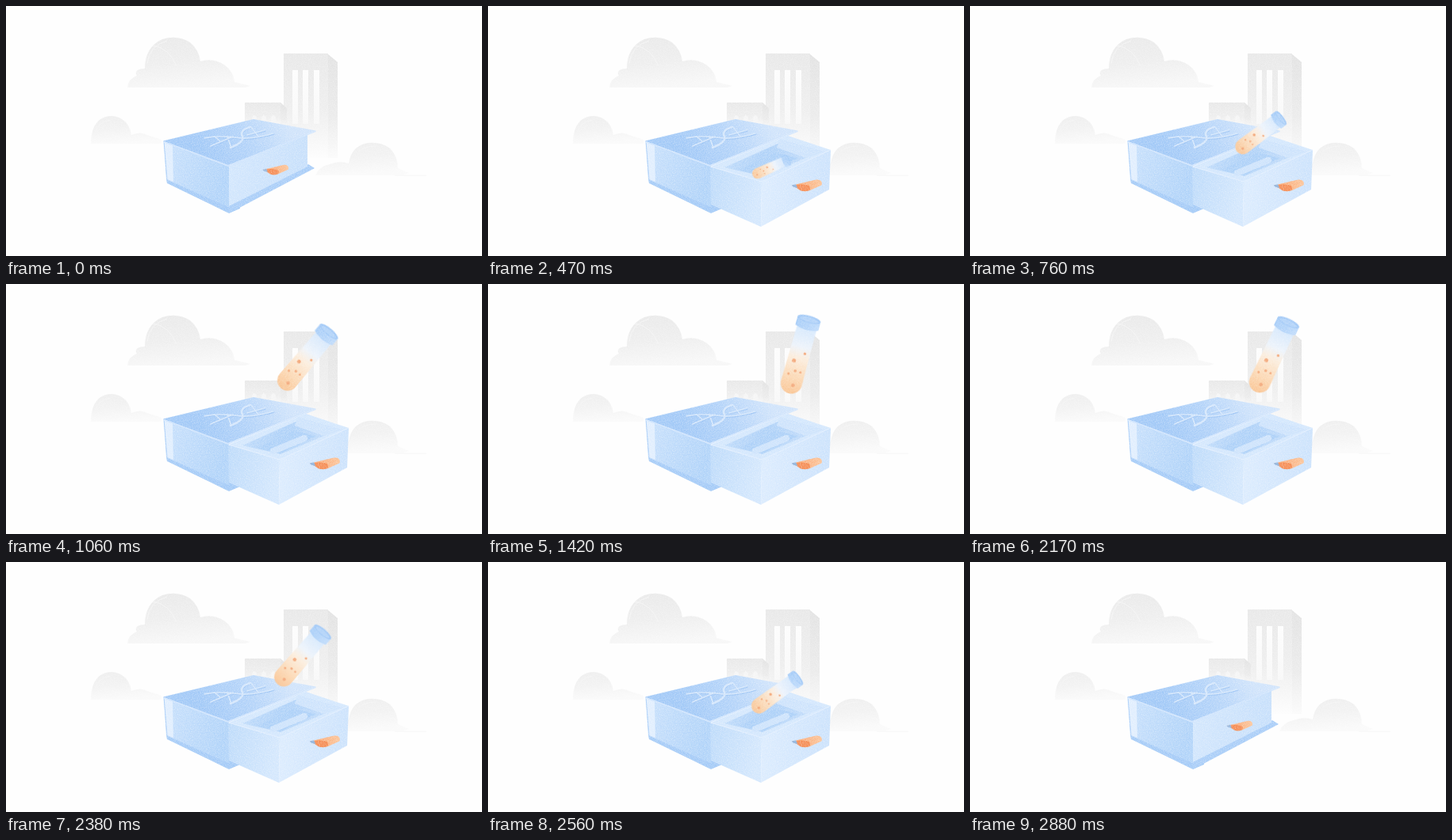
Animation, 600 px wide and 316 px high, one loop 3310 ms. Source, as an HTML page:

```html
<!DOCTYPE html>
<html lang="en">
<head>
<meta charset="utf-8">
<title>Sample box</title>
<style>
  html, body { margin: 0; width: 100%; height: 100%; overflow: hidden; background: #fefefe; }
  svg { display: block; width: 100%; height: 100%; }
</style>
</head>
<body>
<svg viewBox="0 0 600 316">
  <defs>
    <filter id="grain" x="0" y="0" width="100%" height="100%" color-interpolation-filters="sRGB">
      <feTurbulence type="fractalNoise" baseFrequency=".9" numOctaves="2" seed="4"/>
      <feColorMatrix values="0 0 0 0 1  0 0 0 0 1  0 0 0 0 1  .7 0 0 0 -.24"/>
      <feComposite in2="SourceAlpha" operator="in"/>
      <feMerge><feMergeNode in="SourceGraphic"/><feMergeNode/></feMerge>
    </filter>
    <linearGradient id="cloud" x2=".2" y2="1">
      <stop stop-color="#e9e9e9"/><stop offset=".55" stop-color="#eeeeee"/><stop offset="1" stop-color="#f7f7f7"/>
    </linearGradient>
    <linearGradient id="paleCloud" x2=".2" y2="1">
      <stop stop-color="#eeeeee"/><stop offset=".5" stop-color="#f2f2f2"/><stop offset="1" stop-color="#fafafa"/>
    </linearGradient>
    <linearGradient id="wall" x2="0" y2="1">
      <stop stop-color="#e8e8e8"/><stop offset=".55" stop-color="#eeeeee"/><stop offset="1" stop-color="#fdfdfd"/>
    </linearGradient>
    <linearGradient id="side" x2="0" y2="1">
      <stop stop-color="#e2e2e2"/><stop offset=".6" stop-color="#ebebeb"/><stop offset="1" stop-color="#fbfbfb"/>
    </linearGradient>
    <linearGradient id="pane" x2="0" y2="1">
      <stop stop-color="#fdfdfd"/><stop offset="1" stop-color="#f8f8f8"/>
    </linearGradient>
    <linearGradient id="lid" gradientUnits="userSpaceOnUse" x1="255" y1="196" x2="345" y2="138">
      <stop stop-color="#a0c8f7"/><stop offset=".5" stop-color="#b1d2f9"/><stop offset="1" stop-color="#cfe3fb"/>
    </linearGradient>
    <linearGradient id="spine" x2="1" y2=".3">
      <stop stop-color="#c9e1fc"/><stop offset="1" stop-color="#b0d3f9"/>
    </linearGradient>
    <linearGradient id="front" x2="1" y2=".2">
      <stop stop-color="#d3e7fd"/><stop offset="1" stop-color="#c6dffb"/>
    </linearGradient>
    <linearGradient id="trayLeft" x2="1" y2=".2">
      <stop stop-color="#bcdafa"/><stop offset="1" stop-color="#d3e7fd"/>
    </linearGradient>
    <linearGradient id="trayRight" x2="1" y2=".1">
      <stop stop-color="#dcecfe"/><stop offset="1" stop-color="#cbe2fc"/>
    </linearGradient>
    <linearGradient id="well" x2="1" y2=".3">
      <stop stop-color="#c9e1fc"/><stop offset=".5" stop-color="#aed1f8"/><stop offset="1" stop-color="#c2dcfa"/>
    </linearGradient>
    <linearGradient id="tab" x2="1">
      <stop stop-color="#f9a571"/><stop offset="1" stop-color="#fcc498"/>
    </linearGradient>
    <linearGradient id="glass" x2="0" y2="1">
      <stop stop-color="#d2e6fc"/><stop offset=".3" stop-color="#ecf3fb"/><stop offset=".46" stop-color="#fbecdb"/>
      <stop offset=".75" stop-color="#fbd6b0"/><stop offset="1" stop-color="#f9c18d"/>
    </linearGradient>
    <linearGradient id="cap" x2="1">
      <stop stop-color="#a5ccf8"/><stop offset="1" stop-color="#bddafb"/>
    </linearGradient>
    <g id="handle">
      <path d="M328 206L349 201Q357 200 356 206.500L343 212.500Z" fill="url(#tab)"/>
      <path d="M324 207Q333 205.500 340 206.500Q346 208 342.500 212.500Q338 214.300 333 212.500Q329 209.500 324 207Z" fill="#f58b52"/>
      <path d="M323.500 207L328 205.800L330 209.500Q326 210 323.500 207Z" fill="#8fb3dc"/>
    </g>
  </defs>

  <g filter="url(#grain)">
    <path d="M153 103Q154 92 165 88Q160 80 175 79Q175 52 197 42Q216 36 232 46Q243 55 245 70Q262 65 276 75Q287 83 288 96L308 101L302 103Z" fill="url(#cloud)"/>
    <path d="M107 174Q107 152 119 143Q133 135 146 143Q156 149 158 163Q170 158 178 163L196 169V174Z" fill="url(#paleCloud)"/>
    <path d="M390 214Q394 203 408 200Q420 195 432 199Q435 179 452 174Q470 170 484 180Q494 190 494 205L508 211L500 214Z" fill="url(#paleCloud)"/>
    <path d="M350 60H406V192H350Z" fill="url(#wall)"/>
    <path d="M406 61L418 71V192H406Z" fill="url(#side)"/>
    <path d="M361 81h7v68h-7zM374 81h7v68h-7zM388 81h7v68h-7z" fill="url(#pane)"/>
    <path d="M301 122H346V156H301Z" fill="url(#wall)"/>
    <path d="M346 122L354 129V156H346Z" fill="url(#side)"/>
    <path d="M310 150v-9q3-6 6 0v9zM322 150v-9q3-6 6 0v9zM334 150v-9q3-6 6 0v9z" fill="#f5f5f5"/>
  </g>
  <path d="M185 50Q206 53 215 76M178 73Q180 50 203 44M112 160Q116 146 132 144M444 184Q453 177 466 177M490 214H530" fill="none" stroke="#f6f6f6"/>

  <g filter="url(#grain)">
    <path d="M202 219L279 251L295 246V256L281 262L203 224Z" fill="#a3caf7"/>
    <g id="closed">
      <path d="M279 252L381 200L389 205L281 262Z" fill="#a8cdf8"/>
      <path d="M279 200L380 161L380 203L279 254Z" fill="url(#front)"/>
      <use href="#handle"/>
    </g>
    <path d="M199 170L281 200L281 254L202 220Z" fill="url(#spine)"/>
    <path d="M199 171L210 175L211 222L203 219Z" fill="#e0eefe"/>
    <path d="M199 171L203 220L279 254" fill="none" stroke="#a8cdf8"/>
    <g id="open">
      <path d="M281 203L378 164L432 182L345 222Z" fill="#d3e7fd"/>
      <path d="M298 204L370 172L413 187L346 215Z" fill="url(#well)"/>
      <path d="M368 168L424 184L401 192L364 179Z" fill="#cde3fc"/>
      <path d="M318 207L362 185L391 192L346 214Z" fill="#acd0f8"/>
      <path d="M337 211L376 195" stroke="#cde3fc" stroke-width="8" stroke-linecap="round"/>
      <path d="M280 203L345 222L344 279L281 251Z" fill="url(#trayLeft)"/>
      <path d="M345 222L432 182L430 232L344 279Z" fill="url(#trayRight)"/>
      <path d="M281 203L345 222L432 182" fill="none" stroke="#dfedfe"/>
      <use href="#handle" transform="translate(2.500 -16.500) scale(1.175)"/>
    </g>
    <path d="M198 170.500L312 143L390.500 157.500L280 201Z" fill="url(#lid)"/>
    <path d="M198 170.500L280 201L390.500 157.500V159L280 203L198 172Z" fill="#cfe4fd"/>
    <g fill="none" stroke-linecap="round" stroke-linejoin="round">
      <path id="helix" d="M250 167Q268 163 296 167Q314 168 337 161M258 177L286 165M263 165L270 171M279 165L284 179M308 153Q294 157 298 165Q301 172 283 179M309 153L318 165M304 163L326 157" stroke="#9cc4f4" stroke-width="1.600" transform="translate(.7 1)"/>
      <use href="#helix" id="shine"/>
      <path d="M308 153Q294 157 298 165Q301 172 283 179" stroke="#d3e6fc" stroke-width="2.600"/>
    </g>
  </g>

  <g id="tube" filter="url(#grain)">
    <path d="M-12.500 -36H12.500L13.500 37.500A13.500 13.500 0 0 1 -13.500 37.500Z" fill="url(#glass)" opacity=".97"/>
    <g fill="#f3a677">
      <circle cx="-4.500" cy="9.300" r="2.500"/><circle cx="6.500" cy="-2.500" r="1.700"/>
      <circle cx="-6.800" cy="27" r="1.600"/><circle cx=".5" cy="21.500" r="1.800"/>
      <circle cx="7.300" cy="21.700" r="1.500"/><circle cx="2.600" cy="39.800" r="2.300"/>
    </g>
    <path d="M-15 -46V-35Q0 -29 15 -35V-46Z" fill="url(#cap)"/>
    <ellipse cy="-46" rx="15" ry="4.500" fill="#9dc6f6"/>
    <ellipse cy="-45.500" rx="12" ry="3" fill="#b0d2f9"/>
  </g>
</svg>
<script>
  const LOOP = 3310, OPEN = 470, CLOSE = 2880, LIFT = 640, REST = 2710, STEP = 30;
  const el = id => document.getElementById(id);
  const closed = el("closed"), open = el("open"), tube = el("tube");

  // The light strand repeats the shaded one without its offset.
  const shine = el("helix").cloneNode();
  shine.removeAttribute("id");
  shine.removeAttribute("transform");
  shine.setAttribute("stroke", "#d3e6fc");
  el("shine").replaceWith(shine);

  // time, centre x, centre y, tilt, scale
  const poses = [
    [610, 357, 204, 66, .5],
    [760, 365.5, 161.5, 53, .72],
    [940, 375, 115, 43, .89],
    [1150, 381, 85, 37, 1],
    [1420, 392.5, 89, 15.5, 1],
    [1730, 391, 87.5, 6.8, 1],
    [1810, 390, 88, 7.6, 1],
    [2170, 381.5, 90, 25.5, 1],
    [2260, 377, 94.5, 32, 1],
    [2410, 371, 127, 43, .87],
    [2560, 363.5, 166, 54, .72],
    [2710, 357, 204, 66, .5]
  ];

  function slope(i, c) {
    const a = poses[Math.max(i - 1, 0)], b = poses[Math.min(i + 1, poses.length - 1)];
    return (b[c] - a[c]) / (b[0] - a[0]);
  }

  function poseAt(t) {
    let i = 0;
    while (i < poses.length - 2 && t >= poses[i + 1][0]) i++;
    const a = poses[i], b = poses[i + 1], d = b[0] - a[0];
    const u = Math.min(1, Math.max(0, (t - a[0]) / d)), v = 1 - u;
    return [1, 2, 3, 4].map(c =>
      v * v * (1 + 2 * u) * a[c] + u * u * (3 - 2 * u) * b[c] +
      u * v * d * (v * slope(i, c) - u * slope(i + 1, c)));
  }

  function draw(t) {
    const isOpen = t >= OPEN && t < CLOSE;
    closed.style.display = isOpen ? "none" : "";
    open.style.display = tube.style.display = isOpen ? "" : "none";
    if (!isOpen) return;
    const stepped = t < LIFT ? poses[0][0] : Math.min(REST, LIFT + STEP * Math.floor((t - LIFT) / STEP));
    const [x, y, tilt, scale] = poseAt(stepped);
    tube.setAttribute("transform", `translate(${x} ${y}) rotate(${tilt}) scale(${scale})`);
  }

  const start = performance.now();
  function tick() {
    draw((performance.now() - start) % LOOP);
    requestAnimationFrame(tick);
  }
  tick();
</script>
</body>
</html>
```
